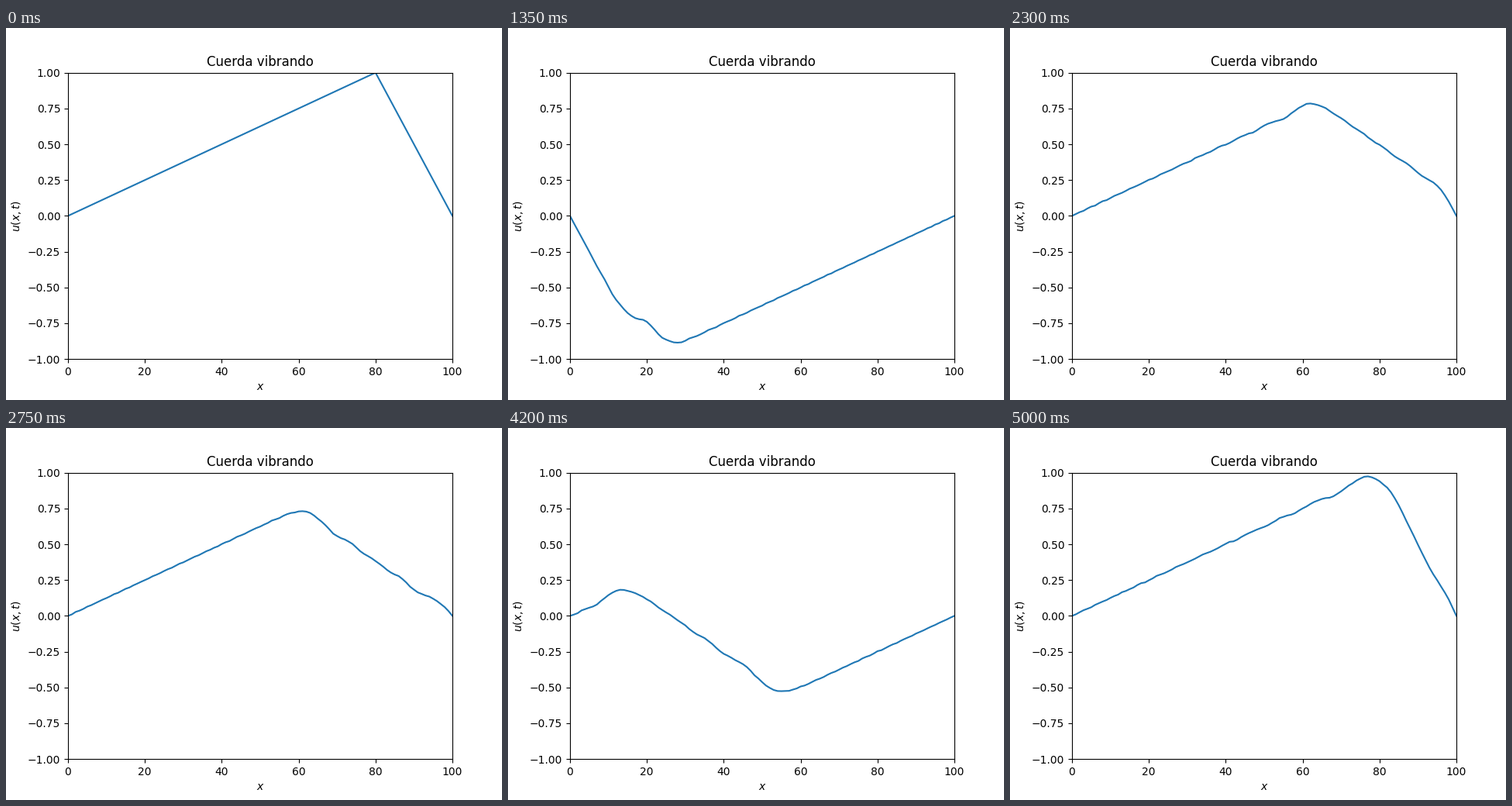
These frames come from a looping animation (640 by 480 pixels, 5050 ms). A matplotlib script:

```python
import numpy as np
import matplotlib.pyplot as plt
from matplotlib.animation import FuncAnimation

N = 100              # string cells
PLUCK = 80           # node where the string is pulled up
COURANT = 0.4        # c * dt / dx
STEPS = 10           # time steps per frame
FRAMES = 101
INTERVAL = 50        # ms


def solve():
    """Leapfrog solution of the wave equation, one row per frame."""
    x = np.arange(N + 1)
    now = np.where(x <= PLUCK, x / PLUCK, (N - x) / (N - PLUCK))
    rows = [now]
    prev = now.copy()
    for step in range(1, (FRAMES - 1) * STEPS + 1):
        if step == 1:
            new = now.copy()     # released at rest
        else:
            new = np.zeros(N + 1)
            bend = now[2:] - 2 * now[1:-1] + now[:-2]
            new[1:-1] = 2 * now[1:-1] - prev[1:-1] + COURANT**2 * bend
        prev, now = now, new
        if step % STEPS == 0:
            rows.append(now)
    return x, np.array(rows)


x, shapes = solve()

fig, ax = plt.subplots(figsize=(6.4, 4.8), dpi=100)
ax.set_xlim(0, N)
ax.set_ylim(-1, 1)
ax.set_title("Cuerda vibrando")
ax.set_xlabel("$x$")
ax.set_ylabel("$u(x,t)$")
line, = ax.plot(x, shapes[0])


def update(frame):
    line.set_ydata(shapes[frame])
    return line,


anim = FuncAnimation(fig, update, frames=FRAMES, interval=INTERVAL,
                     init_func=lambda: update(0), repeat=True, repeat_delay=0)
plt.show()
```
